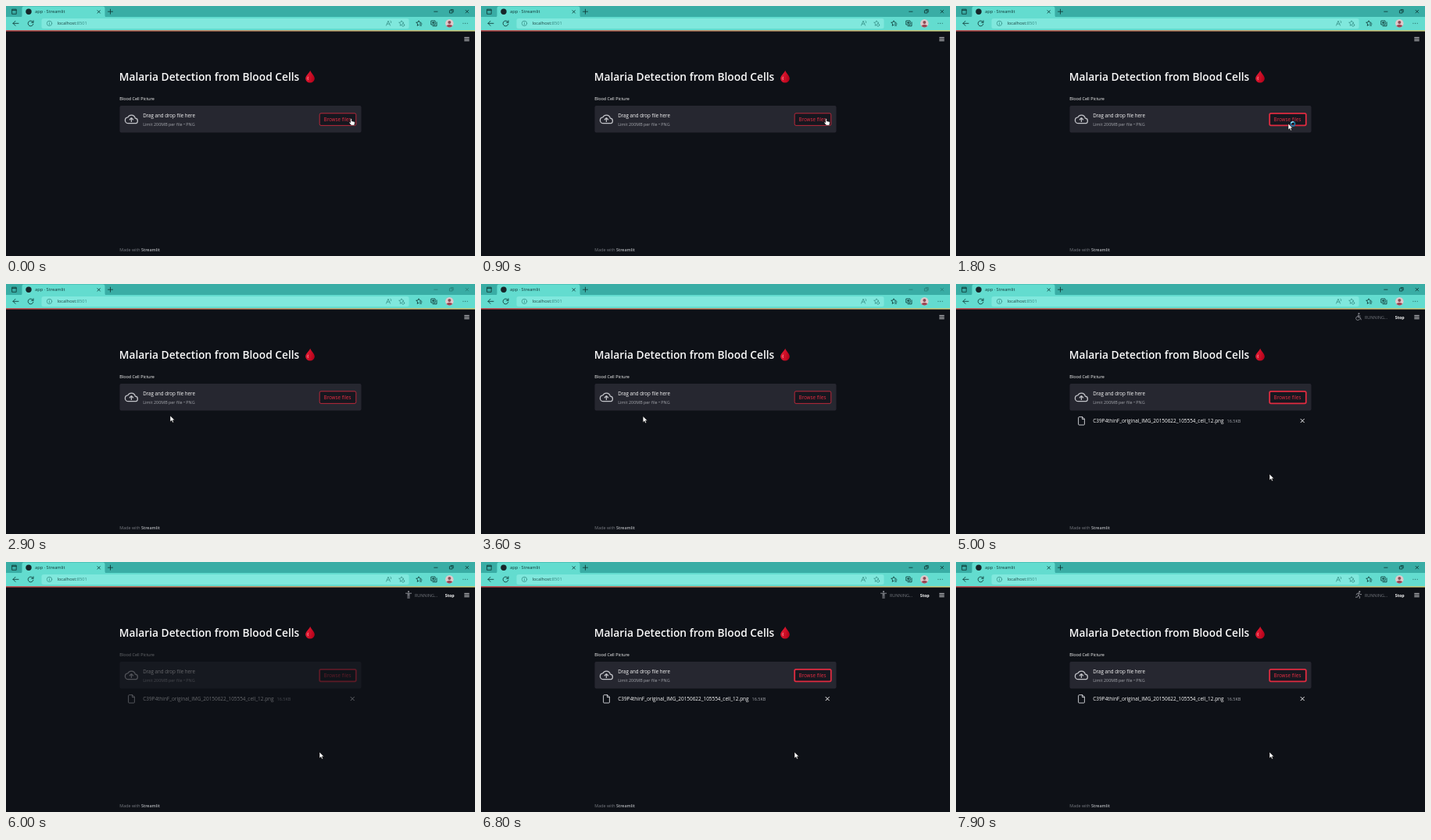
Animation of 600 by 321 pixels, one loop 8000 ms. Source, as an HTML page:

```html
<!DOCTYPE html>
<html lang="en">
<head>
<meta charset="utf-8">
<title>Malaria Detection from Blood Cells</title>
<style>
  html, body { margin: 0; width: 100%; height: 100%; overflow: hidden; background: #0e1117; }
  svg { display: block; width: 600px; height: 321px; font-family: "Open Sans", "Noto Sans", sans-serif; }
  .line { fill: none; stroke-linecap: round; stroke-linejoin: round; }
  .ink { stroke: #11403d; stroke-width: .9; }
  .soft { stroke: #37928a; stroke-width: .8; }
  text { fill: #fafafa; }
  .muted { fill: #a3a5ab; }
  .faint { fill: #777a81; }
</style>
</head>
<body>
<svg viewBox="0 0 600 321">
  <defs>
    <linearGradient id="accent">
      <stop offset="0" stop-color="#d9484b"/>
      <stop offset="1" stop-color="#e9e98a"/>
    </linearGradient>
    <linearGradient id="blood" x1="0" x2="1" y2=".3">
      <stop offset="0" stop-color="#ee2038"/>
      <stop offset="1" stop-color="#b8041c"/>
    </linearGradient>
  </defs>
  <rect width="600" height="321" fill="#0e1117"/>

  <!-- browser window -->
  <rect width="600" height="15" fill="#39ada5"/>
  <path d="M18 14.5Q20.5 14.5 20.5 12V3Q20.5 .5 23 .5H124Q126.5 .5 126.5 3V12Q126.5 14.5 129 14.5Z" fill="#63dccf"/>
  <rect y="14" width="600" height="17.5" fill="#63dccf"/>
  <rect x="45.5" y="16" width="470" height="13" rx="2.5" fill="#80e8dd"/>
  <rect y="31.2" width="600" height="1.3" fill="url(#accent)"/>
  <circle cx="29" cy="7.3" r="3.7" fill="#17262a"/>
  <g class="line ink">
    <path d="M8 4.2H13.2V10.3H8ZM8 5.5H13.2"/>
    <path d="M117 5.7L120.4 9.1M120.4 5.7L117 9.1"/>
    <path d="M133.5 4.2V10.2M130.5 7.2H136.5"/>
    <path d="M16 22.3H9M12 19.3L9 22.3L12 25.3"/>
    <path d="M34.7 21A3.4 3.4 0 1 0 34.9 23.2M35 18.8V21.2H32.6"/>
    <path d="M525 21.3L527 20.8L528 18.8L529 20.8L531 21.3M525 21.3L526.6 22.8L526.2 25.3L528 24.2M529.5 23H532M529.5 25H531.5"/>
    <path d="M544.2 19H549V24H544.2ZM546 25.7H551V20.8M546.6 20.3V22.8M545.4 21.5H547.8"/>
  </g>
  <g class="line soft">
    <circle cx="55.5" cy="22.3" r="3.2"/>
    <path d="M55.5 22V24M55.5 20.6V20.7"/>
    <path d="M486.5 25L489 19L491.5 25M487.4 23H490.6M492 19Q493.4 20 492.6 21.6"/>
    <path d="M503 21.3L505 20.8L506 18.8L507 20.8L509 21.3L507.7 22.5M503 21.3L504.6 22.8L504.2 25.3L505.5 24.5"/>
    <circle cx="508" cy="24.4" r="1.7"/>
  </g>
  <circle cx="567.3" cy="22.3" r="5.2" fill="#dfc9cb"/>
  <path d="M563.3 25.6Q567.3 21.8 571.3 25.6Q567.3 29.3 563.3 25.6Z" fill="#9c4552"/>
  <circle cx="567.3" cy="21" r="2" fill="#8d4b55"/>
  <path d="M584.9 22.3h.1M587.5 22.3h.1M590.1 22.3h.1" class="line ink" stroke-width="1.2"/>
  <path id="controls" class="line ink" d="M547.7 7.2H552M567.8 5.8H571V9H567.8ZM569 4.6H572.2V7.8M588 5.3L591.6 8.9M591.6 5.3L588 8.9"/>
  <text x="37" y="9.3" font-size="5.7" style="fill:#123b39">app · Streamlit</text>
  <text x="65.5" y="24.4" font-size="5.7" style="fill:#174542">localhost:<tspan fill="#348a83">8501</tspan></text>

  <!-- page -->
  <path class="line" d="M586.7 40.4H592.3M586.7 42.5H592.3M586.7 44.6H592.3" stroke="#e4e5e7" stroke-width=".9"/>
  <text x="144.8" y="95.8" font-size="13.75" font-weight="600">Malaria Detection from Blood Cells</text>
  <path d="M389.2 82.8C387.6 87 383.2 89.3 383.2 93.2A5.7 5.2 0 0 0 394.8 93.2C394.8 89.3 390.7 87 389.2 82.8Z" fill="url(#blood)"/>
  <path d="M386.4 91.2Q385.4 93 386.3 94.5" class="line" stroke="#f98a95" stroke-width="1"/>
  <text class="faint" x="145.3" y="315.2" font-size="5.4">Made with <tspan fill="#b3b5ba" font-weight="600">Streamlit</tspan></text>

  <g id="form">
    <text x="145.3" y="121.2" font-size="5.45" font-weight="500">Blood Cell Picture</text>
    <rect x="145.5" y="128" width="309" height="34.6" rx="2" fill="#262730"/>
    <g class="line" transform="translate(152.4 137.4) scale(.667)" stroke="#c4c5ca" stroke-width="1.9">
      <path d="M19.35 10.04C18.67 6.59 15.64 4 12 4 9.11 4 6.6 5.64 5.35 8.04 2.34 8.36 0 10.91 0 14c0 3.31 2.69 6 6 6h13c2.76 0 5-2.24 5-5 0-2.64-2.05-4.78-4.65-4.96Z"/>
      <path d="M12 16.5V9.5M8.8 12.6L12 9.4L15.2 12.6"/>
    </g>
    <text x="175.2" y="142.8" font-size="6.2">Drag and drop file here</text>
    <text class="muted" x="175.2" y="154" font-size="5.4">Limit 200MB per file • PNG</text>
    <rect id="button" x="401.2" y="137.8" width="46.6" height="15.6" rx="1.8" fill="#16171f" stroke="#df2b40"/>
    <text x="406.4" y="147.8" font-size="6.3" style="fill:#e62d42">Browse files</text>
    <g id="file">
      <path class="line" d="M161.5 170.7H157.6Q156.6 170.7 156.6 171.7V180Q156.6 181 157.6 181H163.4Q164.4 181 164.4 180V173.6ZM161.5 170.7V173.6H164.4" stroke="#c4c5ca" stroke-width="1"/>
      <text x="175.2" y="177.9" font-size="6.42">C39P4thinF_original_IMG_20150622_105554_cell_12.png</text>
      <text class="muted" x="346.6" y="177.8" font-size="5.5">16.5KB</text>
      <path class="line" d="M441 173.4L445.4 177.8M445.4 173.4L441 177.8" stroke="#f0f0f2" stroke-width="1"/>
    </g>
  </g>

  <g id="status">
    <g class="line" transform="translate(510 37)" stroke="#85878e">
      <circle id="head" r="1.1" fill="#85878e" stroke="none"/>
      <path id="body"/>
    </g>
    <text class="faint" x="523" y="44.6" font-size="5.4">RUNNING...</text>
    <text x="561.8" y="44.6" font-size="5.3" font-weight="700">Stop</text>
  </g>

  <!-- pointer -->
  <g id="pointer">
    <path id="arrow" d="M0 0V8L1.9 6.3L3.1 9L4.5 8.4L3.3 5.8H5.8Z" fill="#fff" stroke="#000" stroke-width=".5"/>
    <path id="hand" d="M-.8 .4Q0 -.6 .8 .4V3.2L4 4Q5 4.3 4.8 5.5L4.2 8.7H.2L-2.6 5.3Q-2.6 4 -.8 5.2Z" fill="#fff" stroke="#000" stroke-width=".5"/>
    <g id="busy" fill="none" stroke-width="1.5">
      <circle cx="6" cy=".4" r="2.6" stroke="#1b7fae"/>
      <path id="glint" d="M6 -2.2A2.6 2.6 0 0 1 8.6 .4" stroke="#9be6ff"/>
    </g>
  </g>
</svg>
<script>
const $ = id => document.getElementById(id);
const LOOP = 8000, STEP = 100;
const UPLOADED = 4600, FADE = [5000, 5900], RESTORED = 6600;

// [time, x, y] of the pointer tip
const route = [[0, 441.5, 144.5], [900, 441.5, 144.5], [1500, 425, 151], [1900, 425, 151],
  [2700, 210, 169], [3300, 210, 169], [4100, 201, 171], [4500, 201, 171], [4900, 401, 244], [LOOP, 401, 244]];

// running, rowing, wheelchair, standing: [head x, head y, limbs]
const poses = [
  [6.3, 1.2, "M5.6 3L4.6 5.8L6.6 7.2L6.2 9.6M4.6 5.8L3.8 8L1.4 8.2M5.6 3L3 3.4L2.2 5M5.6 3L7 4.7L8.6 4.6"],
  [5, 1.8, "M4.4 3.4L3 6.6L6 6L7.6 8.4M4.4 3.4L7.8 4.6M1 8.8H9.2"],
  [5.4, 1, "M4.8 2.8L4.4 5.8H7L8.2 8.8M4.7 4H7M3.4 4.6A2.5 2.5 0 1 0 6.4 8"],
  [5, 1.1, "M1.4 3.2H8.6M5 3.2V6M4.1 3.4V9.6M5.9 3.4V9.6"]
];

const show = (id, on) => $(id).style.display = on ? "" : "none";
const clamp = v => Math.min(1, Math.max(0, v));
const ease = v => v * v * (3 - 2 * v);

function pointerAt(t) {
  const i = route.findIndex(p => p[0] > t);
  const [t0, x0, y0] = route[i - 1], [t1, x1, y1] = route[i];
  const k = ease((t - t0) / (t1 - t0));
  return [x0 + (x1 - x0) * k, y0 + (y1 - y0) * k];
}

function draw(t) {
  const clicked = t >= 1000, dialog = t >= 2000 && t < 4000;
  const uploaded = t >= UPLOADED, waiting = t >= 1100 && t < 2000;

  $("pointer").setAttribute("transform", `translate(${pointerAt(t)})`);
  show("hand", !clicked);
  show("arrow", clicked);
  show("busy", waiting);
  $("glint").setAttribute("transform", `rotate(${t * .36} 6 .4)`);

  $("controls").style.opacity = dialog ? .4 : 1;
  $("button").setAttribute("stroke-width", clicked && !dialog ? 1.8 : .8);

  show("file", uploaded);
  show("status", uploaded);
  const fade = t < RESTORED ? clamp((t - FADE[0]) / (FADE[1] - FADE[0])) : 0;
  $("form").style.opacity = 1 - .63 * fade * fade;

  if (uploaded) {
    const [x, y, limbs] = poses[Math.floor((t - UPLOADED) / 200) % poses.length];
    $("head").setAttribute("cx", x);
    $("head").setAttribute("cy", y);
    $("body").setAttribute("d", limbs);
  }
}

const start = performance.now();
function tick() {
  const t = (performance.now() - start) % LOOP;
  draw(Math.floor(t / STEP) * STEP);
  requestAnimationFrame(tick);
}
tick();
</script>
</body>
</html>
```
